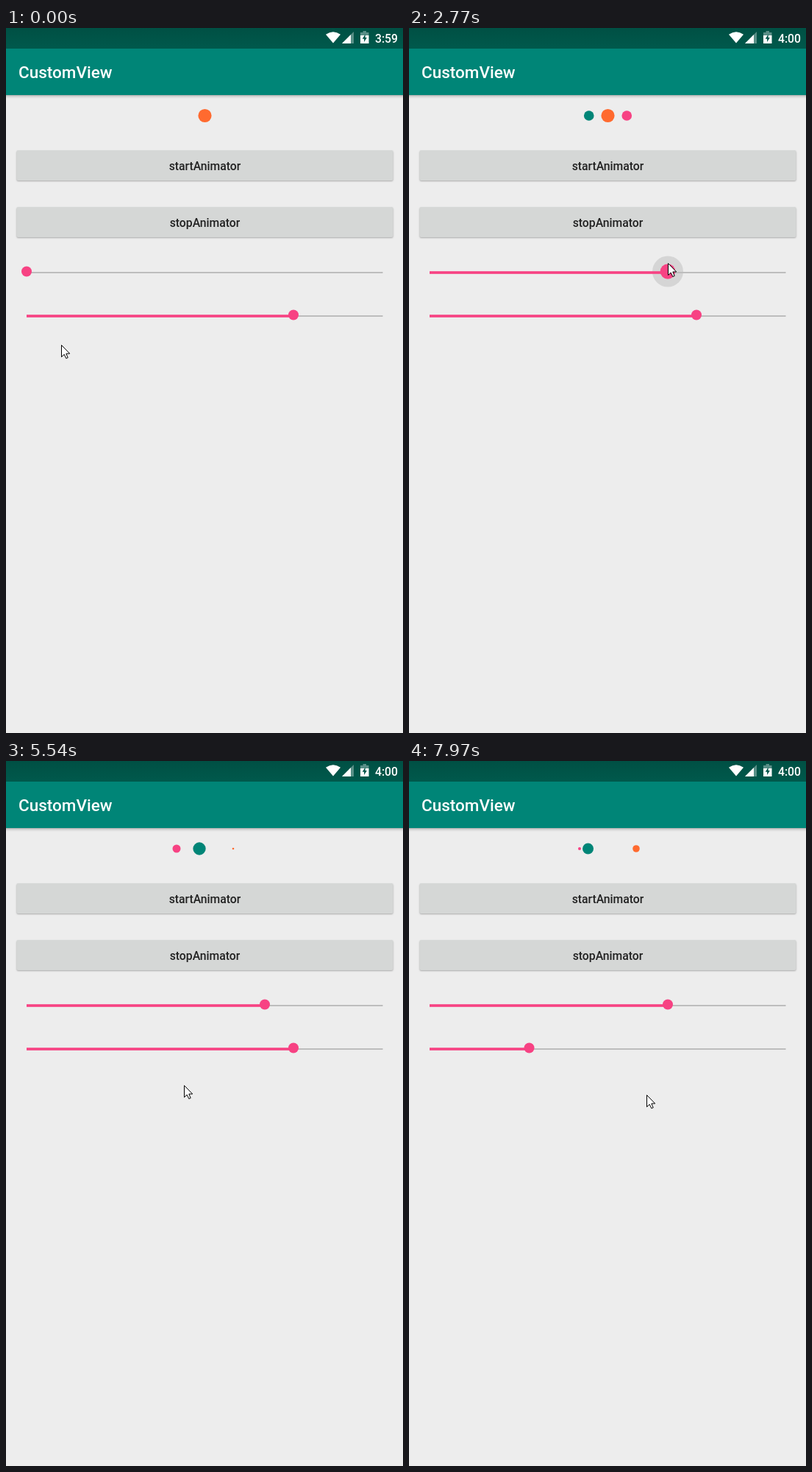
An HTML page with a canvas for the animation above (8000 ms loop, 540x957 px).

```html
<!DOCTYPE html>
<html lang="en">
<head>
<meta charset="utf-8">
<title>CustomView</title>
<style>
html, body { margin: 0; width: 100%; height: 100%; overflow: hidden; background: #ededed; }
canvas { display: block; width: 100vw; height: 100vh; }
</style>
</head>
<body>
<canvas id="stage" width="540" height="957"></canvas>
<script>
const ctx = document.getElementById('stage').getContext('2d');
const LOOP = 8000;
const TEAL = '#008577', ORANGE = '#ff6a2f', PINK = '#f74283';
const TRACK_X = 28, TRACK_W = 484;

// Spans of activity: start, end and number of screen refreshes between them.
const BURSTS = [
  [250, 910, 5], [1190, 2240, 8], [2770, 3190, 3],
  [3620, 4760, 8], [4760, 5810, 8], [5810, 7970, 16]
];

// Pointer stops: time, x, y.
const POINTER = [
  [120, 75, 430], [910, 35, 326], [1110, 35, 326], [1580, 222, 329],
  [2240, 352, 319], [2770, 352, 319], [3190, 268, 181], [3770, 268, 181],
  [4610, 285, 466], [5150, 285, 466], [6200, 168, 395], [6740, 258, 514],
  [7850, 302, 484], [7970, 323, 453]
];

const clamp = (v, min = 0, max = 1) => Math.max(min, Math.min(max, v));
const mix = (a, b, f) => a + (b - a) * f;

// Rises after `down` and falls after `up`, as a pressed control does.
const press = (t, down, up) => clamp(Math.min((t - down) / 150, 1 - (t - up) / 200));

// Poses hold between refreshes, which fall on a 30 ms grid.
function hold(t) {
  const burst = BURSTS.filter(b => b[0] <= t).pop();
  if (!burst) return 0;
  const [start, end, steps] = burst;
  let shown = start;
  for (let i = 1; i <= steps; i++) {
    const tick = start + 30 * Math.floor((end - start) * i / steps / 30);
    if (tick <= t) shown = tick;
  }
  return shown;
}

function pointerAt(t) {
  const next = POINTER.findIndex(stop => stop[0] > t);
  const b = POINTER.at(next), a = next > 0 ? POINTER[next - 1] : b;
  const f = a === b ? 0 : (t - a[0]) / (b[0] - a[0]);
  return [mix(a[1], b[1], f), mix(a[2], b[2], f)];
}

function disc(x, y, r, color) {
  if (r <= 0) return;
  ctx.fillStyle = color;
  ctx.beginPath();
  ctx.arc(x, y, r, 0, Math.PI * 2);
  ctx.fill();
}

function poly(points, color) {
  ctx.fillStyle = color;
  ctx.beginPath();
  points.forEach(([x, y]) => ctx.lineTo(x, y));
  ctx.closePath();
  ctx.fill();
}

function rect(x, y, w, h, color) {
  ctx.fillStyle = color;
  ctx.fillRect(x, y, w, h);
}

function text(label, x, y, size, color, align) {
  ctx.font = `500 ${size}px Roboto, sans-serif`;
  ctx.textAlign = align;
  ctx.fillStyle = color;
  ctx.fillText(label, x, y);
}

function statusBar(t) {
  const bar = ctx.createLinearGradient(0, 0, 0, 28);
  bar.addColorStop(0, '#005044');
  bar.addColorStop(1, '#00594c');
  rect(0, 0, 540, 28, bar);

  ctx.fillStyle = '#fff';
  ctx.beginPath();
  ctx.moveTo(445, 20.5);
  ctx.lineTo(435, 8.7);
  ctx.quadraticCurveTo(445, 1.7, 455, 8.7);
  ctx.fill();

  const faint = 'rgba(255,255,255,.35)';
  poly([[457, 21], [473, 21], [473, 5]], faint);
  poly([[457, 21], [469, 21], [469, 9]], '#fff');

  rect(485.5, 4, 4.5, 2, faint);
  rect(482, 6, 11.5, 4, faint);
  rect(482, 10, 11.5, 11, '#fff');
  poly([[488.7, 8.5], [484.7, 14.7], [487.1, 14.7], [487.1, 19],
        [490.9, 12.9], [488.7, 12.9]], '#00564a');

  text(t < 1300 ? '3:59' : '4:00', 533, 20, 15.75, '#fff', 'right');
}

function appBar() {
  const shade = ctx.createLinearGradient(0, 91, 0, 96);
  shade.addColorStop(0, 'rgba(0,0,0,.28)');
  shade.addColorStop(0.4, 'rgba(0,0,0,.1)');
  shade.addColorStop(1, 'rgba(0,0,0,0)');
  rect(0, 91, 540, 5, shade);
  rect(0, 28, 540, 63, TEAL);
  text('CustomView', 17, 68, 22.5, '#fff', 'left');
}

// `held` is the time since the touch began.
function button(label, y, lift = 0, held = -1) {
  ctx.save();
  ctx.shadowColor = 'rgba(0,0,0,.28)';
  ctx.shadowBlur = 2 + 4 * lift;
  ctx.shadowOffsetY = 1 + lift;
  ctx.fillStyle = lift > 0.5 ? '#d2d4d3' : '#d5d7d6';
  ctx.beginPath();
  ctx.roundRect(14.5, y, 512, 41, 2);
  ctx.fill();
  ctx.restore();
  if (held >= 0) {
    ctx.save();
    ctx.clip();
    disc(268.5, y + 15, 55.5 + held * 0.8, `rgba(0,0,0,${0.065 * clamp(1 - held / 350)})`);
    ctx.restore();
  }
  text(label, 270.5, y + 27, 15.75, '#212121', 'center');
}

function slider(x, y, pressed, halo) {
  const thumbY = y - 1.5;
  disc(x, thumbY, 21 * halo, 'rgba(0,0,0,.1)');
  rect(TRACK_X, y - 1, TRACK_W + 0.5, 2, '#bdbdbd');
  rect(TRACK_X, y - 1.8, x - TRACK_X, 3.6, PINK);
  disc(x, thumbY, 7 + 3.3 * pressed, PINK);
}

const CENTER = 270.5, DOT_Y = 119, DOT_R = 9.1, EDGE_R = DOT_R * 0.75, REACH = 38.5;
const START = 3858, STAGE_MS = 118.5;

// Four stages: grow on the right, slide to the middle, slide left, shrink.
function loopingDot(phase, color) {
  const p = phase % 4;
  const side = clamp(2 - p, -1, 1);
  const size = clamp(Math.min(p, 4 - p));
  disc(CENTER + REACH * side, DOT_Y, mix(DOT_R, EDGE_R, Math.abs(side)) * size, color);
}

function dots(t, spread) {
  if (t < START) {
    disc(CENTER - REACH * spread, DOT_Y, EDGE_R, TEAL);
    disc(CENTER + REACH * spread, DOT_Y, EDGE_R, PINK);
    disc(CENTER, DOT_Y, DOT_R, ORANGE);
    return;
  }
  const phase = 2 + (t - START) / STAGE_MS;
  loopingDot(phase + 2, TEAL);
  loopingDot(phase + 3, PINK);
  loopingDot(phase, ORANGE);
}

function pointer([x, y]) {
  ctx.save();
  ctx.translate(Math.round(x) + 0.5, Math.round(y) + 0.5);
  poly([[0, 0], [0, 16], [3.7, 12.6], [6.3, 18], [8.7, 17], [6.3, 11.5], [11.2, 11.5]], '#fff');
  ctx.strokeStyle = '#000';
  ctx.stroke();
  ctx.restore();
}

function draw(t) {
  // The first thumb trails the pointer while it is dragged.
  const dragX = Math.max(TRACK_X, pointerAt(Math.min(t, 2700) - 62)[0]);
  const spreadX = t < 1110 ? TRACK_X : dragX;
  const spreadPress = press(t, 1110, 2770);
  const touched = t - 3620;

  rect(0, 0, 540, 957, '#ededed');
  statusBar(t);
  appBar();
  dots(t, (spreadX - TRACK_X) / TRACK_W);
  button('startAnimator', 166, press(t, 3470, 3770), touched < 350 ? touched : -1);
  button('stopAnimator', 243);
  slider(spreadX, 332, spreadPress, spreadPress);
  slider(t < 6000 ? 391 : 163.5, 391, press(t, 5980, 6200), 0);
  pointer(pointerAt(t));
}

const begin = performance.now();
function frame() {
  draw(hold((performance.now() - begin) % LOOP));
  requestAnimationFrame(frame);
}
frame();
</script>
</body>
</html>
```
